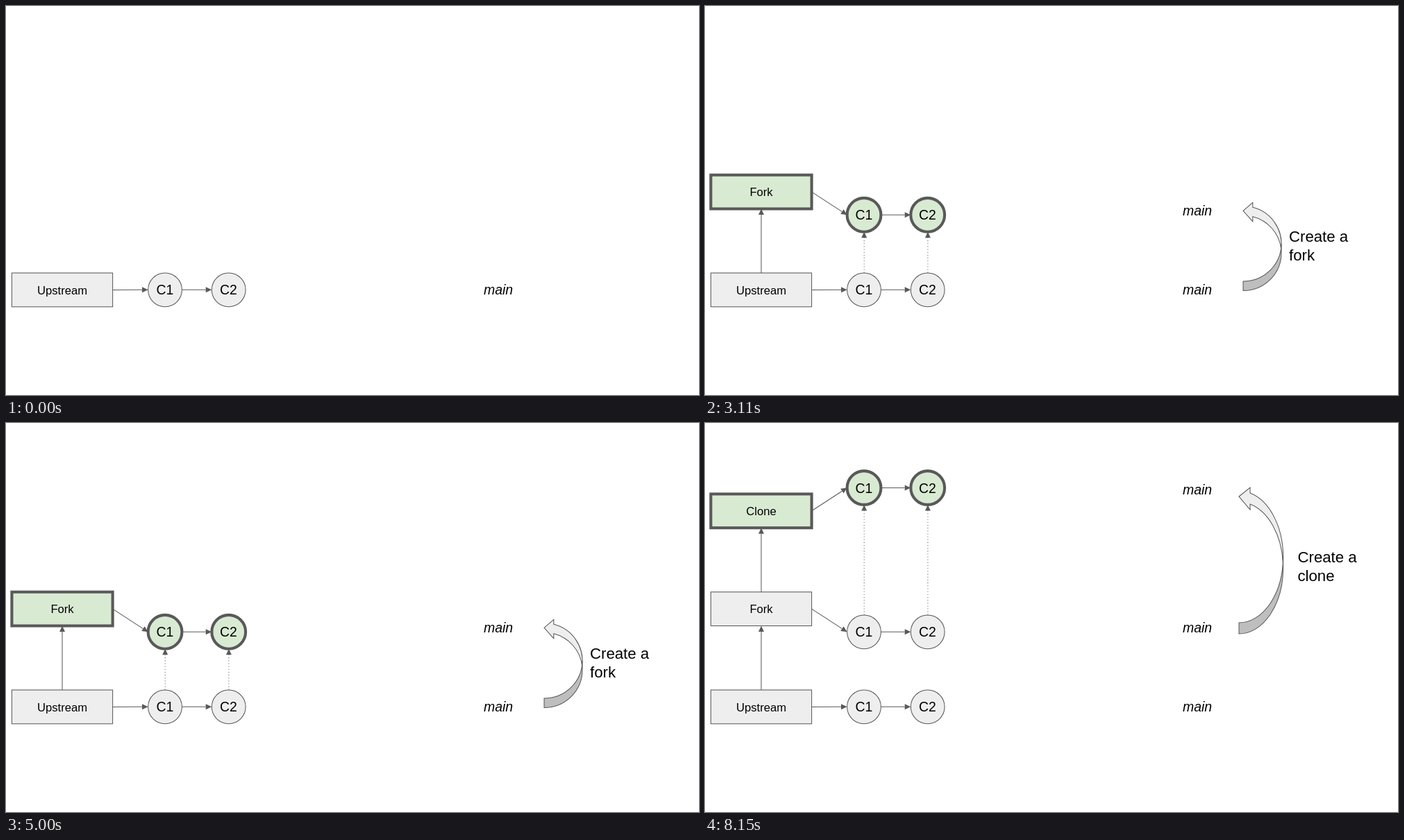
An HTML page for the animation above (9410 ms loop, 998 by 561 pixels).

```html
<!DOCTYPE html>
<html lang="en">
<head>
<meta charset="utf-8">
<title>Fork and clone</title>
<style>
  html, body { margin: 0; width: 100%; height: 100%; overflow: hidden; background: #fff; }
  svg { display: block; width: 998px; height: 561px; font-family: Arial, "Liberation Sans", sans-serif; }
  text { fill: #000; }
  .name { font-size: 16.6px; text-anchor: middle; }
  .commit { font-size: 19.4px; text-anchor: middle; }
  .branch { font-size: 19.4px; font-style: italic; }
  .caption { font-size: 22.2px; }
  .shape { fill: #eee; stroke: #595959; stroke-width: 1.04; }
  .shade { fill: #bebebe; }
  .new { fill: #d9ead3; stroke-width: 4.1; }
  .line { stroke: #595959; stroke-width: 1.04; }
  .dotted { stroke-dasharray: 1.04 3.12; }
  .head { fill: #595959; }
  .second, .third, .later { visibility: hidden; animation: 9410ms step-end infinite; }
  .second { animation-name: second; }
  .third { animation-name: third; }
  .later { animation-name: later; }
  @keyframes second {
    0% { visibility: hidden; }
    33.05% { visibility: visible; }
    66.525%, 100% { visibility: hidden; }
  }
  @keyframes third {
    0% { visibility: hidden; }
    66.525%, 100% { visibility: visible; }
  }
  @keyframes later {
    0% { visibility: hidden; }
    33.05%, 100% { visibility: visible; }
  }
</style>
</head>
<body>
<svg id="stage" viewBox="0 0 998 561"></svg>
<script>
  const C1 = 229, C2 = 320.7, R = 24.4;
  const BOX = { x: 8.4, w: 145.2, h: 48.8, mid: 81 };
  const ROWS = {
    Upstream: { box: 409.4, commits: 409.3, main: 416.3 },
    Fork: { box: 268.1, commits: 301.3, main: 302.4 },
    Clone: { box: 126.8, commits: 93.5, main: 103.3 }
  };

  const text = (cls, x, y, s) => `<text class="${cls}" x="${x}" y="${y}">${s}</text>`;
  const group = (cls, ...parts) => `<g class="${cls}">${parts.join('')}</g>`;

  function arrow(x1, y1, x2, y2, cls = '') {
    const len = Math.hypot(x2 - x1, y2 - y1);
    const ux = (x2 - x1) / len, uy = (y2 - y1) / len;
    const bx = x2 - ux * 8.6, by = y2 - uy * 8.6;
    const nx = -uy * 4, ny = ux * 4;
    return `<line class="line ${cls}" x1="${x1}" y1="${y1}" x2="${bx}" y2="${by}"/>` +
      `<path class="head" d="M${x2} ${y2}L${bx + nx} ${by + ny}L${bx - nx} ${by - ny}Z"/>`;
  }

  function commit(x, y, label, cls) {
    return `<circle class="shape ${cls}" cx="${x}" cy="${y}" r="${R}"/>` + text('commit', x - 0.2, y + 7, label);
  }

  function nodes(name, cls = '') {
    const { box, commits } = ROWS[name];
    return `<rect class="shape ${cls}" x="${BOX.x}" y="${box - BOX.h / 2}" width="${BOX.w}" height="${BOX.h}"/>` +
      text('name', BOX.mid, box + 6.1, name) + commit(C1, commits, 'C1', cls) + commit(C2, commits, 'C2', cls);
  }

  function links(name) {
    const { box, commits, main } = ROWS[name];
    return arrow(BOX.x + BOX.w, box, C1 - R, commits) +
      arrow(C1 + R, commits, C2 - R, commits) + text('branch', 688, main, 'main');
  }

  const rise = (from, to) =>
    arrow(BOX.mid, ROWS[from].box - BOX.h / 2, BOX.mid, ROWS[to].box + BOX.h / 2);

  const copies = (from, to) => [C1, C2].map(x =>
    arrow(x + 0.2, ROWS[from].commits - R, x + 0.2, ROWS[to].commits + R, 'dotted')).join('');

  // Ribbon between two equal half ellipses, the lower one shifted down by d.
  function ribbon({ x, cy, rx, ry, d, head, half }) {
    const arc = (sweep, px, py) => `A${rx} ${ry} 0 0 ${sweep} ${px} ${py}`;
    const neck = x + head;
    const top = cy - ry * Math.sqrt(1 - (head / rx) ** 2);
    const mid = top + d / 2;
    const crossX = x + rx * Math.sqrt(1 - (d / 2 / ry) ** 2), crossY = cy + d / 2;
    const tail = `M${x} ${cy + ry + d}${arc(0, x + rx, cy + d)}L${x + rx} ${cy}${arc(1, x, cy + ry)}Z`;
    const front = `M${x} ${cy - ry + d / 2}L${neck} ${mid - half}V${top}${arc(1, crossX, crossY)}` +
      `${arc(0, neck, top + d)}V${mid + half}Z`;
    return `<path class="shape shade" d="${tail}"/><path class="shape" d="${front}"/>`;
  }

  const caption = (x, y, word) => text('caption', x, y, 'Create a') + text('caption', x, y + 26.8, word);

  document.getElementById('stage').innerHTML = [
    group('', links('Upstream'), nodes('Upstream')),
    group('later', rise('Upstream', 'Fork'), links('Fork')),
    group('second', nodes('Fork', 'new'), copies('Upstream', 'Fork'),
      ribbon({ x: 775, cy: 342.8, rx: 55, ry: 54.2, d: 13.5, head: 13.8, half: 13.8 }),
      caption(841, 340.4, 'fork')),
    group('third', nodes('Fork'), rise('Fork', 'Clone'), links('Clone'), nodes('Clone', 'new'),
      copies('Fork', 'Clone'),
      ribbon({ x: 769, cy: 193, rx: 63.6, ry: 95, d: 16, head: 16, half: 16 }),
      caption(853.5, 201.3, 'clone'))
  ].join('');
</script>
</body>
</html>
```
